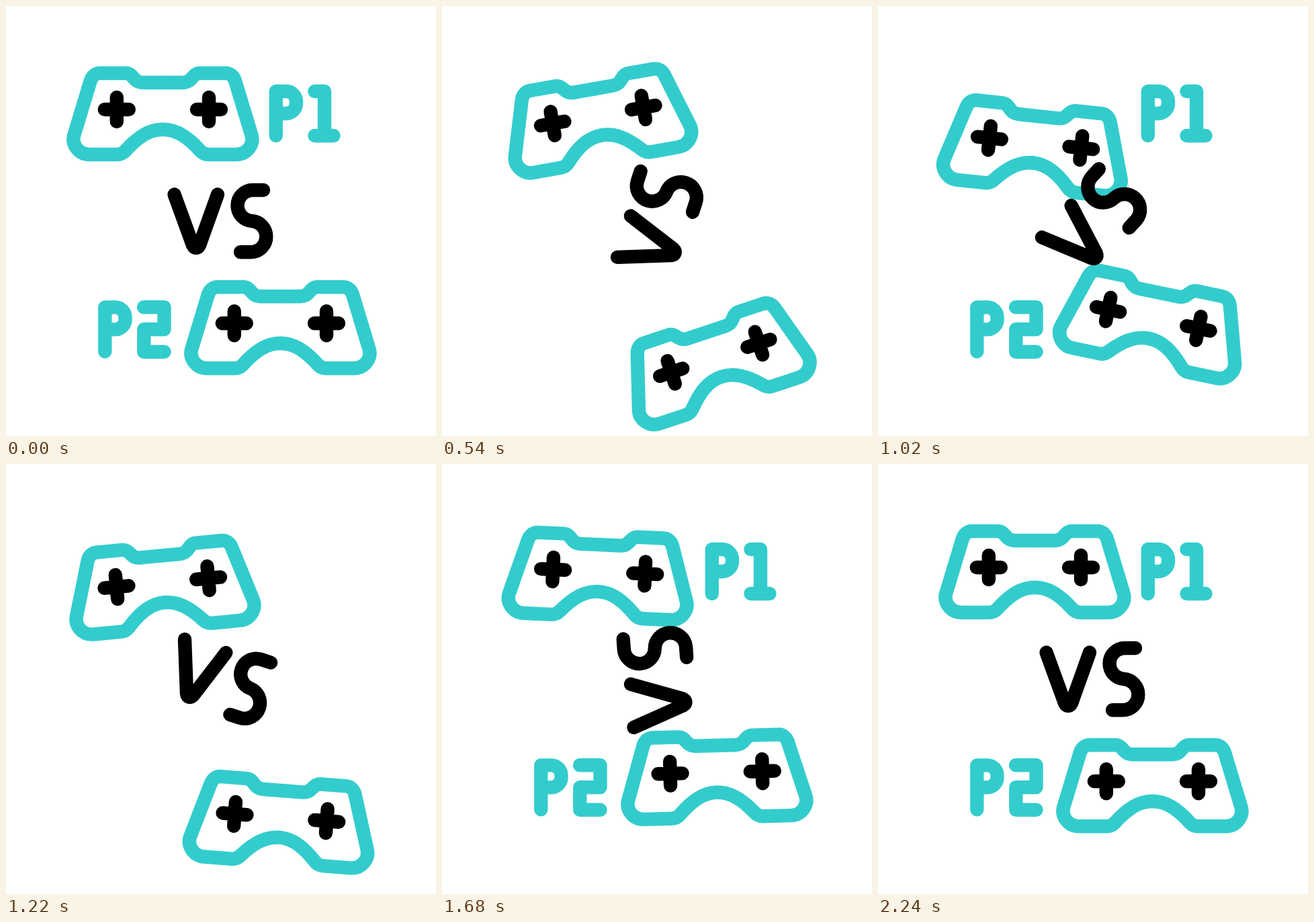
Recreate the animation shown at these times as an HTML page with a canvas. Size 640 by 640 pixels, loop 2.4 s.

```html
<!DOCTYPE html>
<html lang="en">
<head>
<meta charset="utf-8">
<title>P1 vs P2</title>
<style>
  html, body { margin: 0; width: 100%; height: 100%; overflow: hidden; background: #fff; }
  canvas { display: block; width: 100vmin; height: 100vmin; }
</style>
</head>
<body>
<canvas id="stage" width="640" height="640"></canvas>
<script>
const ctx = document.getElementById('stage').getContext('2d');
const TEAL = '#33cccc', BLACK = '#000';
const TICK = 20, TICKS = 120;
const LAG = 8; // the lower pad repeats the upper pad's bounce a little later

// Monotone cubic through [tick, value] knots, at rest at both ends.
function curve(knots) {
  const last = knots.length - 1;
  const secant = i => (knots[i + 1][1] - knots[i][1]) / (knots[i + 1][0] - knots[i][0]);
  const slopes = knots.map((_, i) => {
    if (i === 0 || i === last) return 0;
    const a = secant(i - 1), b = secant(i);
    return a * b > 0 ? 2 * a * b / (a + b) : 0;
  });
  return t => {
    if (t <= knots[0][0]) return knots[0][1];
    if (t >= knots[last][0]) return knots[last][1];
    let i = 0;
    while (t >= knots[i + 1][0]) i++;
    const [t0, v0] = knots[i], [t1, v1] = knots[i + 1];
    const h = t1 - t0, u = (t - t0) / h, w = 1 - u;
    return v0 * w * w * (1 + 2 * u) + v1 * u * u * (3 - 2 * u)
      + h * u * w * (slopes[i] * w - slopes[i + 1] * u);
  };
}

const padDrop = curve([[0, 0], [18, 52], [27, 8.9], [32, -28], [35, -33], [40, -22.4],
  [53, 53.9], [61, 22.5], [65, -5], [71, -20.5], [81, -1], [90, 16.5], [96, 9.8], [104, 0]]);
const padTilt = curve([[0, 0], [18, -18.5], [27, -10], [32, 0.3], [41, 12.2], [53, 4.4],
  [61, -5.4], [67, -8], [73, -3.3], [88, 3.4], [96, 1.5], [104, 0]]);
const versusSpin = curve([[0, 0], [27, -72], [37, -88], [40, -86.5], [61, 17.9],
  [73, 155.8], [96, 345.7], [105, 360]]);

const halfPad = new Path2D('M0-46.6H-29C-34.5-46.6-37.5-47.6-40.4-50.4'
  + 'C-45-54.6-47.5-60.6-55-60.6H-93.4C-100.5-60.6-105.8-56-108-48.1'
  + 'L-131.4 29.4C-137.2 45-125.5 60.4-109.4 60.4H-68'
  + 'C-62 60.4-59 58.5-55.8 55C-36 33-19 23.2 0 23.2');
const halfButtons = new Path2D('M-86.6-6.6H-50.6M-68.6-24.6V11.4');
const letterP = new Path2D('M401.8 193V127H417A15 15 0 0 1 432 142V145A15 15 0 0 1 417 160H402');
const digit1 = new Path2D('M459.5 127H474V193M459.5 193H487.5');
const digit2 = new Path2D('M205 448.3H235.5V481.3H205.3V514.8H235.5');
const versus = new Path2D('M250.5 280.5L278 356Q280 360 283 360Q286 360 288 356L315 280.5'
  + 'M383 274H367.5A23 23 0 0 0 344.5 297A23 23 0 0 0 366 320'
  + 'A23 23 0 0 1 387.3 343A23 23 0 0 1 364.5 366.3H349');

function stroke(path, color) {
  ctx.strokeStyle = color;
  ctx.stroke(path);
}

function placed(x, y, degrees, draw) {
  ctx.save();
  ctx.translate(x, y);
  ctx.rotate(degrees * Math.PI / 180);
  draw();
  ctx.restore();
}

function drawPad(x, y, tick) {
  placed(x, y + padDrop(tick), padTilt(tick), () => {
    for (let side = 0; side < 2; side++) {
      stroke(halfPad, TEAL);
      stroke(halfButtons, BLACK);
      ctx.scale(-1, 1);
    }
  });
}

function drawLabels() {
  stroke(letterP, TEAL);
  stroke(digit1, TEAL);
  placed(-254.5, 321.4, 0, () => stroke(letterP, TEAL));
  stroke(digit2, TEAL);
}

function labelsVisible(tick) {
  return tick >= 72 || tick % 36 < 18;
}

function draw(tick) {
  ctx.fillStyle = '#fff';
  ctx.fillRect(0, 0, 640, 640);
  ctx.lineWidth = 20.4;
  ctx.lineCap = ctx.lineJoin = 'round';
  if (labelsVisible(tick)) drawLabels();
  drawPad(233.4, 160.6, tick);
  drawPad(408.4, 478.8, tick - LAG);
  placed(320, 320, versusSpin(tick), () => {
    ctx.translate(-320, -320);
    stroke(versus, BLACK);
  });
}

const start = performance.now();
function loop() {
  const elapsed = performance.now() - start;
  draw(Math.floor(elapsed / TICK + 0.01) % TICKS);
  requestAnimationFrame(loop);
}
loop();
</script>
</body>
</html>
```
